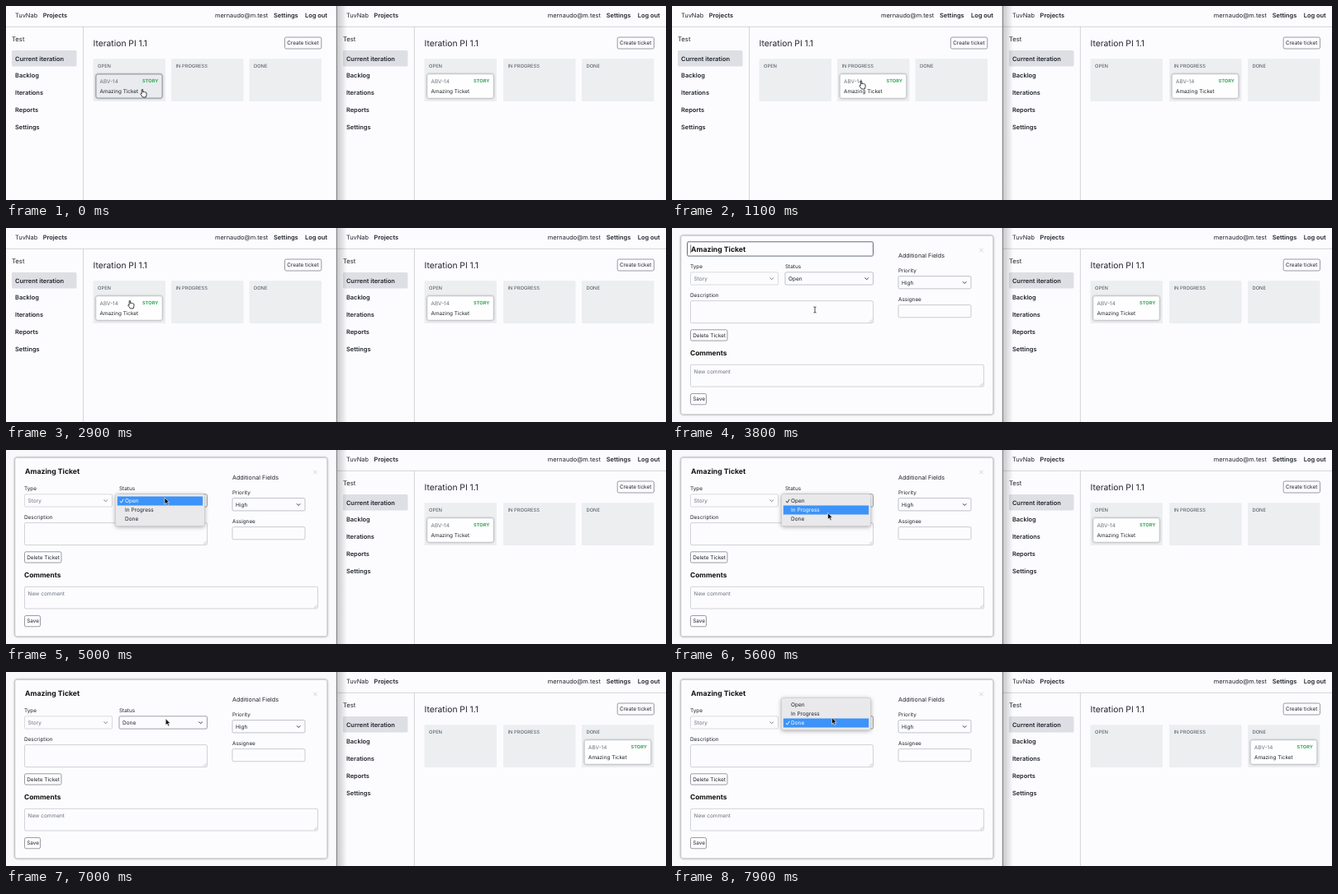
Write an HTML page that moves like this. It is 799 px wide and 236 px high and loops after 8000 ms.

```html
<!DOCTYPE html>
<html lang="en">
<head>
<meta charset="utf-8">
<title>Ticket board</title>
<style>
  html, body { margin: 0; height: 100%; overflow: hidden; background: #fcfcfe; }
  svg { display: block; width: 100vw; height: 100vh; font-family: Inter, sans-serif; text-rendering: geometricPrecision; }
  text { white-space: pre; }
  .card { filter: drop-shadow(0 .6px .8px #0006); }
  .menu { filter: drop-shadow(0 1.5px 2.5px #0005); }
</style>
</head>
<body>
<svg id="stage" viewBox="0 0 799 236"></svg>
<script>
const LOOP = 8000, STEP = 100;
const INK = '#20242c', GREY = '#6b7280', PAPER = '#fcfcfe';
const DROP_1 = 800, GRAB_2 = 1900, DROP_2 = 2500, MODAL = 3800;
const MENU_1 = 4700, PICK = 6100, CLOSED = 6300, MENU_2 = 7400;
const STATES = ['Open', 'In Progress', 'Done'];

// Pointer hot spot: time, x, y
const pointer = [
  [0, 165, 101], [100, 165, 101], [800, 229, 91], [1200, 229, 91], [1700, 260, 93],
  [1900, 260, 93], [2500, 148, 87], [2800, 148, 87], [3400, 173, 99.5], [3900, 173, 99.5],
  [4500, 192, 58], [5100, 192, 58], [5900, 187, 85], [6300, 187, 85], [7100, 193.5, 55.5], [8000, 193.5, 55.5]
];

function pointerAt(t) {
  const i = pointer.findIndex(p => p[0] > t);
  const [t0, x0, y0] = pointer[i - 1], [t1, x1, y1] = pointer[i];
  const u = (t - t0) / (t1 - t0), e = u * u * (3 - 2 * u);
  return [x0 + (x1 - x0) * e, y0 + (y1 - y0) * e];
}

// y is the middle of the capitals
const text = (x, y, str, size = 6.4, weight = 400, fill = INK) =>
  `<text x="${x}" y="${y + size * .36}" font-size="${size}" font-weight="${weight}" fill="${fill}">${str}</text>`;
const rect = (x, y, w, h, fill, stroke = 'none', r = 1.5, width = .7) =>
  `<rect x="${x}" y="${y}" width="${w}" height="${h}" rx="${r}" fill="${fill}" stroke="${stroke}" stroke-width="${width}"/>`;
const line = (d, stroke, width = .8) =>
  `<path d="${d}" fill="none" stroke="${stroke}" stroke-width="${width}"/>`;
const button = (x, y, w, h, label) =>
  rect(x, y, w, h, PAPER, '#71757d', 1.8) + text(x + 2.7, y + h / 2, label);

function card(x, y, active = false) {
  return `<g class="card">${rect(x, y, 80, 29, active ? '#e9ebee' : '#fefefe', active ? '#7b828d' : '#d5d7db', 2)}</g>` +
    text(x + 4.5, y + 8.7, 'ABV-14', 6.4, 400, GREY) +
    text(x + 56, y + 7.8, 'STORY', 5.7, 700, '#38a55c') +
    text(x + 4.5, y + 20.2, 'Amazing Ticket');
}

function board(left, shift, columns, column, active) {
  const right = left + shift;
  const sidebar = ['Current iteration', 'Backlog', 'Iterations', 'Reports', 'Settings'];
  return rect(left, 0, 400, 236, PAPER, 'none', 0) +
    text(left + 11, 11.5, 'TuvNab', 7.45) + text(left + 44.7, 11.5, 'Projects', 7.45, 600) +
    text(right + 253, 11.5, 'mernaudo@m.test', 7.4) +
    text(right + 324, 11.5, 'Settings', 7.45, 600) + text(right + 362, 11.5, 'Log out', 7.45, 600) +
    line(`M${left} 25.3h400M${left + 93.5} 25v211`, '#c9cbd0') +
    text(left + 7, 40, 'Test', 7.7) +
    rect(left + 7, 54, 78.5, 19.5, '#dddfe4') +
    sidebar.map((s, i) => text(left + 11, 64 + i * 20.8, s, 7.45, 600)).join('') +
    text(columns[0], 45.3, 'Iteration PI 1.1', 10.3) +
    button(right + 337.5, 38, 44.3, 14, 'Create ticket') +
    ['OPEN', 'IN PROGRESS', 'DONE'].map((s, i) =>
      rect(columns[i], 64.3, 87.5, 51.7, '#eceef0', 'none', 1) +
      text(columns[i] + 5.5, 73, s, 5.8, 400, '#4b515c')).join('') +
    card(columns[column] + 3.5, 83, active);
}

function select(x, y, w, value, ink = INK, border = '#a5a9b0') {
  return rect(x, y, w, 15.3, PAPER, border) + text(x + 4, y + 7.6, value, 6.5, 400, ink) +
    line(`M${x + w - 10} ${y + 6.7}l2.2 2.2 2.2-2.2`, ink, .9);
}

function area(x, y, w, h) {
  return rect(x, y, w, h, PAPER, '#bfc2c8') +
    line(`M${x + w - 4.5} ${y + h - 1}l3.5-3.5m-1.5 3.5l1.5-1.5`, '#999', .5);
}

function modal(t) {
  const titleFocus = t < 4700;
  return rect(0, 0, 400, 236, '#f9f9fb', 'none', 0) +
    `<g class="card">${rect(10.8, 9.3, 378, 217.5, PAPER, '#bcbec3', 2.5)}</g>` +
    (titleFocus ? rect(18.5, 16.8, 225, 17.3, PAPER, '#666d7a', 1.5, 1) + line('M22.7 20.5v10', '#222', .6) : '') +
    text(23, 25.5, 'Amazing Ticket', 8.7, 700, '#111') +
    line('M372.2 24.7l4.6 4.6m0-4.6l-4.6 4.6', '#c3c5ca', .7) +
    text(274, 33.7, 'Additional Fields', 7.2) +
    text(22, 47, 'Type') + select(22.5, 53.8, 106, 'Story', GREY, '#c9cbd0') +
    text(137, 47, 'Status') +
    select(137, 53.8, 106.5, t < CLOSED ? 'Open' : 'Done', INK, titleFocus ? '#a5a9b0' : '#737984') +
    text(274, 51.5, 'Priority') + select(274, 58.6, 88, 'High') +
    text(274, 86.7, 'Assignee') + rect(274, 93.6, 88, 15.2, PAPER, '#b5b8be') +
    text(22, 82, 'Description') + area(22.5, 88.6, 221, 27) +
    button(22.5, 123.8, 44.5, 13.3, 'Delete Ticket') +
    text(22, 152, 'Comments', 8.4, 700, '#111') +
    area(22.5, 166.3, 355, 26.7) + text(26.5, 174.3, 'New comment', 6.5, 400, GREY) +
    button(22.5, 201.5, 19, 13.3, 'Save');
}

function menu(firstRow, checked, active, opacity) {
  return `<g class="menu" opacity="${opacity}">` +
    rect(132.5, firstRow - 8.5, 108, 39, '#e9e9eb', '#c4c4c8', 2.5, .5) +
    rect(134.8, firstRow + active * 11 - 5.5, 103.4, 11, '#3d93f8', 'none', 0) +
    STATES.map((s, i) => {
      const ink = i === active ? '#fff' : INK, y = firstRow + i * 11;
      return text(144, y, s, 6.5, 400, ink) +
        (i === checked ? line(`M138 ${y}l1.5 2.2 2.7-4.4`, ink, .9) : '');
    }).join('') + '</g>';
}

const shapes = {
  arrow: '<path d="M0 0v8l1.9-1.7 1.3 2.9 1.4-.6-1.3-2.9h2.5z" fill="#111" stroke="#fff" stroke-width=".6"/>',
  hand: '<path d="M-.7.8Q0-.6.8.8V4l.4-.7q.9-.4 1.2.4 1-.5 1.4.3 1.2-.2 1.3 1V7L4.3 10H.6L-2 6.3q-.3-1.2 1.3-.6z" fill="#fff" stroke="#111" stroke-width=".8"/>',
  beam: line('M-1.6-3.6Q0-3.6 0-2.6 0-3.6 1.6-3.6M0-2.6V2.6M-1.6 3.6Q0 3.6 0 2.6 0 3.6 1.6 3.6', '#222', .8)
};

function scene(t) {
  const [x, y] = pointerAt(t);
  const drag1 = t > 100 && t < DROP_1, drag2 = t > GRAB_2 && t < DROP_2;
  const hover = t < DROP_1 || (t > 1200 && t < DROP_2) || t > 2900;
  const leftColumn = t >= DROP_1 && t < DROP_2 ? 1 : 0;
  const rightColumn = t < 900 ? 0 : t < 2600 ? 1 : t < 6400 ? 0 : 2;
  let out = board(400.9, 1.8, [506.5, 602, 697], rightColumn, false) +
    rect(401, 0, 12, 236, 'url(#shade)', 'none', 0);

  if (t < MODAL) out += board(0, 0, [105.5, 200, 294.5], leftColumn, hover);
  else out += modal(t);

  if (drag1 || drag2) out += `<g opacity=".86">${card(x - 56.5, y - (drag1 ? 18 : 10), true)}</g>`;
  if (t >= MENU_1 && t < CLOSED) {
    const row = Math.max(0, Math.min(2, Math.round((y - 62) / 11)));
    out += menu(62, 0, row, t > PICK ? .6 : 1);
  }
  if (t >= MENU_2) out += menu(40, 2, 2, 1);

  const shape = t < MODAL ? (drag1 || drag2 ? 'arrow' : 'hand') : y > 88 ? 'beam' : 'arrow';
  return `<defs><linearGradient id="shade"><stop stop-color="#000" stop-opacity=".2"/><stop offset="1" stop-color="#000" stop-opacity="0"/></linearGradient></defs>` +
    out + rect(399.8, 0, 1.2, 236, '#85868a', 'none', 0) +
    `<g transform="translate(${x} ${y})">${shapes[shape]}</g>`;
}

const stage = document.getElementById('stage');
let shown = -1;
function tick() {
  const t = Math.floor(performance.now() % LOOP / STEP) * STEP;
  if (t !== shown) stage.innerHTML = scene(shown = t);
  requestAnimationFrame(tick);
}
tick();
</script>
</body>
</html>
```
